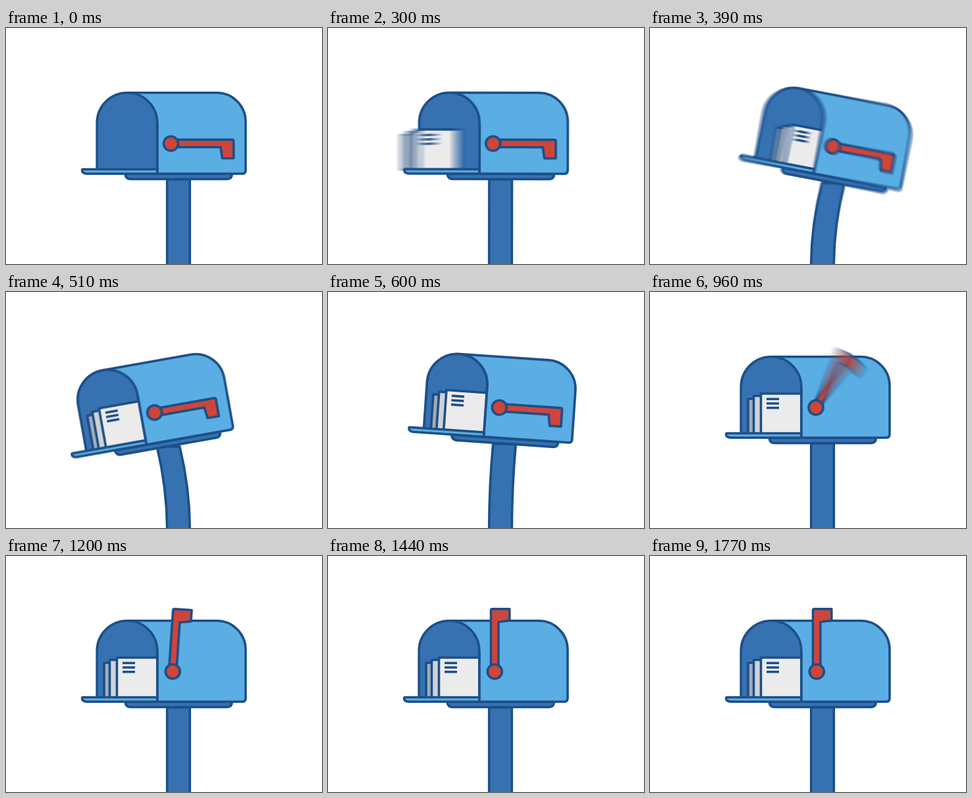
Recreate the animation shown at these times as an HTML page with a canvas. Size 480x360 px, loop 1800 ms.

```html
<!DOCTYPE html>
<html lang="en">
<head>
<meta charset="utf-8">
<title>Mailbox</title>
<style>
  html, body { margin: 0; width: 100%; height: 100%; overflow: hidden; background: #fff; }
  canvas { display: block; width: 480px; height: 360px; }
</style>
</head>
<body>
<canvas id="stage" width="480" height="360"></canvas>
<script>
const LOOP = 1800, STEP = 30, SHUTTER = 15, SAMPLES = 12;
const INK = '#1d4f88', LIGHT = '#5aaee3', DARK = '#3672b1', RED = '#d0453a';
const PAPER = '#ebebec', PAPER_MID = '#ced2d8', PAPER_DARK = '#a2adb8';
const JOINT = { x: 262, y: 231 };

const view = document.getElementById('stage').getContext('2d');
const layer = document.createElement('canvas');
layer.width = 480;
layer.height = 360;
const g = layer.getContext('2d');

// Keys are [time, value] pairs.
const smooth = p => (1 - Math.cos(Math.PI * p)) / 2;
const tilt = [[300, 0], [355, 14], [505, -10.3], [600, 4], [690, 0]];
const slide = [[240, -87], [360, 20], [450, 0]];
const lift = [[900, 0], [1012, -108], [1165, -85], [1290, -91.5], [1410, -90]];
const hinge = [[900, 250.5], [1012, 253.3]];

function track(keys, t) {
  if (t <= keys[0][0]) return keys[0][1];
  for (let i = 1; i < keys.length; i++) {
    const [t0, a] = keys[i - 1], [t1, b] = keys[i];
    if (t < t1) return a + (b - a) * smooth((t - t0) / (t1 - t0));
  }
  return keys[keys.length - 1][1];
}

const rad = deg => deg * Math.PI / 180;

function shape(path, fill) {
  const p = new Path2D(path);
  if (fill) {
    g.fillStyle = fill;
    g.fill(p);
  }
  g.stroke(p);
}

function drawPost(dx, dy) {
  const top = JOINT.y + dy, mid = (364 + top) / 2;
  const edge = x => `${x} ${mid} ${x + dx} ${top}`;
  shape(`M244.7 364Q${edge(244.7)}H${279.3 + dx}Q279.3 ${mid} 279.3 364Z`, DARK);
}

function drawLetters(offset) {
  g.save();
  g.beginPath();
  g.rect(-300, 0, 530, 400);
  g.clip();
  g.translate(offset, 0);
  shape('M149 163H170V216H149Z', PAPER_DARK);
  shape('M157.5 158.5H175V216H157.5Z', PAPER_MID);
  shape('M168.5 155H230V216H168.5Z', PAPER);
  shape('M177 163.3H196M177 170H196M177 176.7H196');
  g.restore();
}

function drawFlag(x, angle) {
  g.save();
  g.translate(x, 176.2);
  g.rotate(rad(angle));
  shape('M0 -5.8H93Q95.3 -5.8 95.3 -3.5V22.5H78L75.5 5.6H0Z', RED);
  g.beginPath();
  g.arc(0, 0, 11, 0, 2 * Math.PI);
  g.fill();
  g.stroke();
  g.restore();
}

function drawScene(t) {
  const angle = track(tilt, t);
  const dx = 1.52 * angle, dy = 0.047 * angle * angle;
  g.fillStyle = '#fff';
  g.fillRect(0, 0, 480, 360);
  g.strokeStyle = INK;
  g.lineWidth = 3.6;
  g.lineJoin = 'round';

  drawPost(dx, dy);
  g.save();
  g.translate(JOINT.x + dx, JOINT.y + dy);
  g.rotate(rad(angle));
  g.translate(-JOINT.x, -JOINT.y);

  shape('M181 222.5H343.5Q343 230.5 336 230.5H189Q182 230.5 181 222.5Z', DARK);
  shape('M184 98.8H320A44 44 0 0 1 364 142.8V217Q364 222.3 358.7 222.3H184Z', LIGHT);
  shape('M138.2 216V144.6A45.8 45.8 0 0 1 229.8 144.6V216Z', DARK);
  if (t >= 240) drawLetters(track(slide, t));
  shape('M117 215.5H229.8V222.2H122Q115.5 221.5 115.6 217Q115.7 215.5 117 215.5Z', LIGHT);
  shape('M229.8 146V222.2');
  drawFlag(track(hinge, t), track(lift, t));
  g.restore();
}

const moving = t => (t >= 240 && t < 690) || (t >= 900 && t < 1410);

function render(now) {
  const t = Math.floor(now % LOOP / STEP) * STEP;
  const count = moving(t) ? SAMPLES : 1;
  // Equal-weight average of the poses seen while the shutter is open.
  for (let i = 0; i < count; i++) {
    drawScene(t + SHUTTER * ((i + 0.5) / count - 0.5));
    view.globalAlpha = 1 / (i + 1);
    view.drawImage(layer, 0, 0);
  }
}

const start = performance.now();
function tick() {
  render(performance.now() - start);
  requestAnimationFrame(tick);
}
tick();
</script>
</body>
</html>
```
